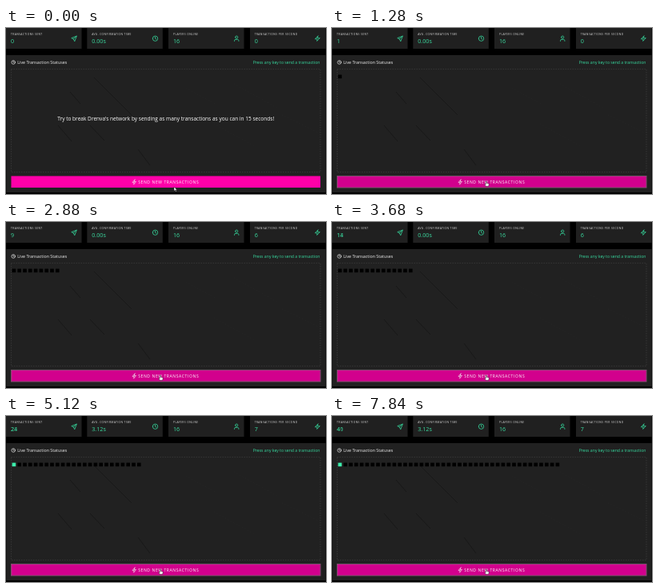
Animation of 400x208 px, one loop 8000 ms. Source, as an HTML page:

```html
<!DOCTYPE html>
<html lang="en">
<head>
<meta charset="utf-8">
<title>Live transactions</title>
<style>
  html, body { margin: 0; width: 100%; height: 100%; overflow: hidden; background: #000; }
  svg { display: block; width: 100vw; height: 100vh; font-family: "Open Sans", "Noto Sans", sans-serif; }
  .label { font-size: 3.3px; letter-spacing: .4px; fill: #d8d8d8; }
  .value { font-size: 7.2px; fill: #3bdca0; }
  .icon { fill: none; stroke: #35d69b; stroke-width: .8; stroke-linejoin: round; stroke-linecap: round; }
  .white { stroke: #f2f2f2; stroke-width: .65; }
</style>
</head>
<body>
<svg viewBox="0 0 400 208" preserveAspectRatio="none">
  <rect width="400" height="208" fill="#000"/>
  <g id="cards"></g>

  <rect x=".5" y="34" width="399" height="172" fill="#212121"/>
  <g fill="none" stroke-width=".7">
    <path stroke="#151515" d="M80 80l13 15M110 62l47 47M65 122l17 20M105 122l18 19M165 152l15 20"/>
    <path stroke="#292929" stroke-dasharray="1 3" d="M225 75l36 20M285 70l56 31M345 109l45 22M260 120l50 28"/>
  </g>
  <rect x="6.5" y="51.5" width="386.5" height="129" fill="none" stroke="#444" stroke-width=".6" stroke-dasharray="1.5 1.5"/>

  <g class="icon white"><circle cx="9.2" cy="43" r="2.3"/><path d="M9.2 41.6V43l.9.6"/></g>
  <text x="14.3" y="45" font-size="5.3" fill="#f2f2f2">Live Transaction Statuses</text>
  <text x="392.5" y="45" font-size="5.15" fill="#38dba0" text-anchor="end">Press any key to send a transaction</text>
  <text id="intro" x="199.7" y="116.2" font-size="6.55" fill="#fff" text-anchor="middle">Try to break Drenva's network by sending as many transactions as you can in 15 seconds!</text>
  <g id="squares"></g>

  <rect id="button" x="6.5" y="185.5" width="386.5" height="14.5"/>
  <path class="icon white" d="M161 190l-3 3.5h2.2l-.6 2.6 3-3.6h-2.2z"/>
  <text x="165.2" y="194.8" font-size="5" letter-spacing=".62" fill="#fff">SEND NEW TRANSACTIONS</text>

  <g id="cursor" stroke="#222" stroke-width=".5" stroke-linejoin="round" fill="#fff">
    <path id="arrow" d="M0 0v5.2l1.3-1.1.9 2 .9-.4-.9-1.9h1.6z"/>
    <path id="hand" d="M-.7 .4q.6-.8 1.2 0v2l2.3.6q.6.3.4 1l-.5 2.3h-3.2l-1.7-2.2q.2-.8 1.5 0z"/>
  </g>
</svg>
<script>
const LOOP = 8000, STEP = 160;
const PITCH = 6.8, MAX = 41;
const CLICK = 960, START = 1120, CONFIRM = 4320;

const sentKeys = [[1120, 1], [1760, 1], [2780, 9], [3680, 14], [5120, 24],
                  [6300, 32], [6560, 33.6], [6720, 33.6], [7840, 41]];
const rateKeys = [[0, 0], [2560, 6], [4320, 7], [5920, 6], [7200, 7]];
const xKeys = [[0, 210], [160, 208], [320, 205], [480, 205], [960, 193]];
const yKeys = [[0, 199], [160, 197], [320, 195], [480, 195], [960, 192]];

const $ = id => document.getElementById(id);

function add(parent, tag, attrs, text = "") {
  const el = document.createElementNS("http://www.w3.org/2000/svg", tag);
  for (const k in attrs) el.setAttribute(k, attrs[k]);
  el.textContent = text;
  return parent.appendChild(el);
}

function lerp(keys, t) {
  if (t <= keys[0][0]) return keys[0][1];
  for (let i = 1; i < keys.length; i++) {
    const [t0, a] = keys[i - 1], [t1, b] = keys[i];
    if (t <= t1) return a + (b - a) * (t - t0) / (t1 - t0);
  }
  return keys[keys.length - 1][1];
}

const hold = (keys, t) => keys.filter(k => k[0] <= t).pop()[1];

function card(x, textX, label, iconX, icon) {
  const g = $("cards");
  add(g, "rect", { x, y: 0, width: 94.5, height: 26, fill: "#202020" });
  add(g, "text", { x: textX, y: 9.3, class: "label" }, label);
  add(g, "path", { class: "icon", d: icon, transform: `translate(${iconX} 13.2)` });
  return add(g, "text", { x: textX, y: 18.5, class: "value" });
}

const sent = card(0, 6, "TRANSACTIONS SENT", 85, "M3-3L-3.2-.6-.7.6.6 3.2zL-.7.6");
const time = card(101.3, 107.2, "AVG. CONFIRMATION TIME", 186.5, "M-3.2 0a3.2 3.2 0 1 0 6.4 0a3.2 3.2 0 1 0-6.4 0M0-1.8V0l1.3.8");
const online = card(203, 209, "PLAYERS ONLINE", 288.2, "M-1.6-1.6a1.6 1.6 0 1 0 3.2 0a1.6 1.6 0 1 0-3.2 0M-2.7 3.2V2.6Q-2.7 1.2-1.2 1.2H1.2Q2.7 1.2 2.7 2.6V3.2");
const rate = card(305, 310.7, "TRANSACTIONS PER SECOND", 389.3, "M.6-3.2L-3 .6H-.2L-.6 3.2 3-.6H.2z");
const ghost = add($("cards"), "text", { x: 6, y: 18.5, class: "value", opacity: .5 });
online.textContent = "16";

const squares = Array.from({ length: MAX }, (_, i) =>
  add($("squares"), "rect", { x: 7.6 + i * PITCH, y: 58.6, width: 4.6, height: 4.6 }));

function draw(ms) {
  const t = Math.floor(ms / STEP) * STEP;
  const progress = t < START ? 0 : lerp(sentKeys, t) + 1e-6;
  const count = Math.floor(progress);
  const confirmed = t >= CONFIRM;
  const hover = t >= 640;

  sent.textContent = count;
  ghost.textContent = count > 9 && progress - count < .2 ? count - 1 : "";
  time.textContent = confirmed ? "3.12s" : "0.00s";
  rate.textContent = hold(rateKeys, t);

  squares.forEach((s, i) => {
    s.setAttribute("visibility", i < count ? "visible" : "hidden");
    s.setAttribute("fill", i === 0 && confirmed ? "#3df0ac" : "#000");
  });

  $("intro").setAttribute("visibility", t < START ? "visible" : "hidden");
  $("button").setAttribute("fill", hover ? "#d2008d" : "#ff00a8");
  $("button").setAttribute("stroke", t >= CLICK ? "#80506f" : "none");
  $("cursor").setAttribute("transform", `translate(${lerp(xKeys, t)} ${lerp(yKeys, t)})`);
  $("arrow").setAttribute("visibility", hover ? "hidden" : "visible");
  $("hand").setAttribute("visibility", hover ? "visible" : "hidden");
}

const begin = performance.now();
function tick() {
  draw((performance.now() - begin) % LOOP);
  requestAnimationFrame(tick);
}
tick();
</script>
</body>
</html>
```
